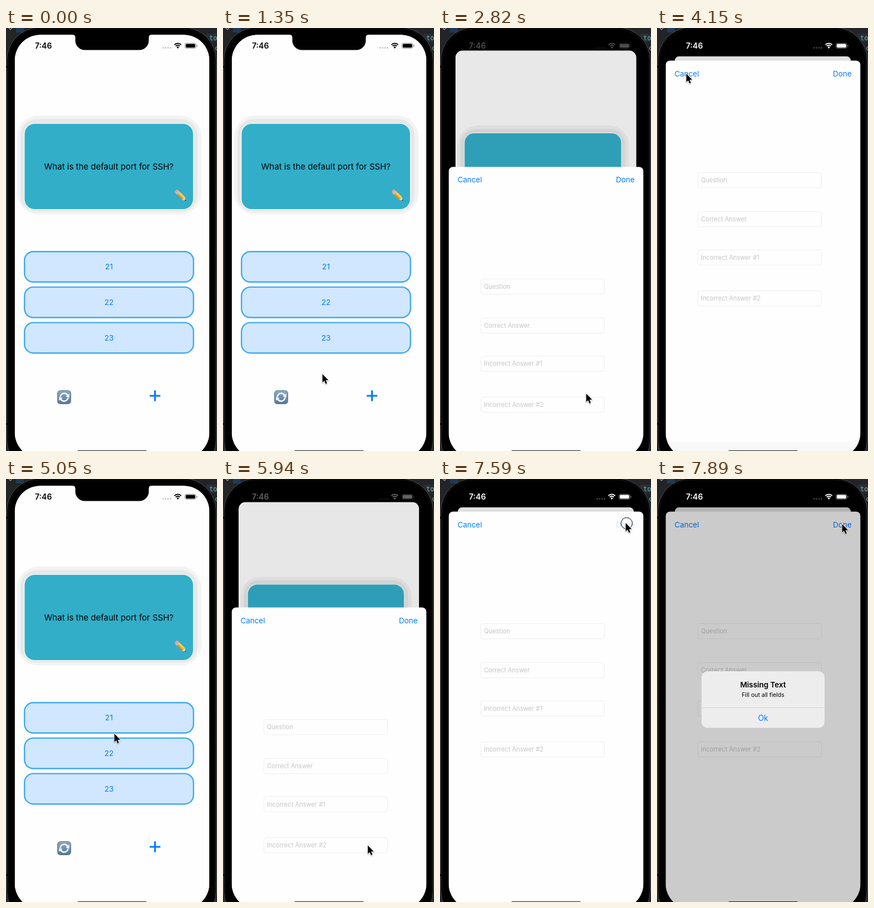
An HTML page with a canvas for the animation above (8000 ms loop, 379 by 759 pixels).

```html
<!DOCTYPE html>
<html lang="en">
<head>
<meta charset="utf-8">
<title>Quiz cards</title>
<style>
html, body { margin: 0; width: 100%; height: 100%; overflow: hidden; background: #1f2023; }
canvas { display: block; width: 379px; height: 759px; }
</style>
</head>
<body>
<canvas id="stage"></canvas>
<script>
const W = 379, H = 759, LOOP = 8000;
const BLUE = '#007aff';
const SCREEN = { x: 15.5, y: 12, w: 350, h: 760, r: 46 };
const SHEET_TOP = 58.5;
const canvas = document.getElementById('stage');
const ctx = canvas.getContext('2d');
const dpr = window.devicePixelRatio || 1;
canvas.width = W * dpr;
canvas.height = H * dpr;

const lerp = (a, b, k) => a + (b - a) * k;
const clamp = v => Math.max(0, Math.min(1, v));

const shortTicks = [3, 7, 12, 15, 20, 30];
const ticks = Array.from({ length: 47 }, (_, n) =>
  1050 + 150 * n - 10 * shortTicks.filter(s => s <= n).length);

// Pointer path: tick, x, y
const path = [
  [0, 305, 605], [1, 232, 608], [2, 178, 621], [3, 178, 621], [4, 192, 628],
  [6, 238, 648], [7, 255, 654], [8, 262, 656], [14, 262, 656], [15, 258, 640],
  [16, 238, 580], [17, 190, 430], [18, 130, 250], [19, 80, 130], [20, 56, 90],
  [21, 52, 82], [23, 52, 82], [24, 62, 115], [25, 95, 205], [26, 145, 330],
  [27, 194, 457], [28, 228, 560], [29, 250, 630], [30, 259, 655], [31, 259.5, 657.5],
  [38, 259.5, 657.5], [39, 267, 610], [40, 290, 420], [41, 315, 230], [42, 328, 120],
  [43, 333, 80], [44, 333, 79], [46, 332, 81]
];
const press = { 10: 'add', 22: 'cancel', 31: 'add', 44: 'done' };

function pointerAt(n) {
  const i = Math.max(1, path.findIndex(k => k[0] >= n));
  const [n0, x0, y0] = path[i - 1], [n1, x1, y1] = path[i];
  const k = (n - n0) / (n1 - n0);
  return [lerp(x0, x1, k), lerp(y0, y1, k)];
}

function spring(ms) {
  if (ms <= 0) return 0;
  const a = ms * 0.013;
  return 1 - (1 + a) * Math.exp(-a);
}

function sheetAt(t) {
  const p = t < 4390 ? spring(t - 2620) : t < 5729 ? 1 - spring(t - 4390) : spring(t - 5729);
  return p < 0.004 ? 0 : p > 0.997 ? 1 : p;
}

function rounded(x, y, w, h, r) {
  ctx.beginPath();
  ctx.roundRect(x, y, w, h, r);
}

function box(x, y, w, h, r, fill, stroke, line = 1) {
  rounded(x, y, w, h, r);
  if (fill) { ctx.fillStyle = fill; ctx.fill(); }
  if (stroke) { ctx.strokeStyle = stroke; ctx.lineWidth = line; ctx.stroke(); }
}

function circle(x, y, r) {
  ctx.beginPath();
  ctx.arc(x, y, r, 0, 7);
}

function poly(...pts) {
  ctx.beginPath();
  pts.forEach(([x, y]) => ctx.lineTo(x, y));
  ctx.closePath();
}

// y is the middle of the capitals
function label(str, x, y, size, color, align = 'left', weight = 400) {
  ctx.font = `${weight} ${size}px Inter, sans-serif`;
  ctx.textAlign = align;
  ctx.fillStyle = color;
  ctx.fillText(str, x, y + size * 0.364);
}

function faded(alpha, draw) {
  ctx.save();
  ctx.globalAlpha *= alpha;
  draw();
  ctx.restore();
}

function device() {
  ctx.fillStyle = '#232427';
  ctx.fillRect(0, 0, W, H);
  ctx.fillStyle = '#2a2d33';
  ctx.fillRect(360, 10, 19, 15);
  ctx.fillStyle = '#1f3a56';
  ctx.fillRect(18, 0, 14, 8);
  ctx.strokeStyle = '#a0a0a0';
  ctx.lineWidth = 1.2;
  ctx.beginPath();
  ctx.moveTo(5, 0); ctx.lineTo(8, 3); ctx.lineTo(11, 0);
  ctx.stroke();
  ctx.font = '12px "DejaVu Sans Mono", monospace';
  ctx.textAlign = 'left';
  ctx.fillStyle = '#66b5b8';
  ctx.fillText('to', 365, 22);
  ctx.fillText('c', 375, 40);
  box(1.5, -1, 376, 800, 59, '#000', '#4c4d50', 1);
  box(4, 1.5, 371, 800, 57, '#000', '#19191a', 1);
  ctx.fillStyle = '#09090a';
  ctx.fillRect(0, 68, 2, 3);
  ctx.fillRect(0, 709, 2, 3);
}

function pencil() {
  ctx.save();
  ctx.translate(304.5, 291.5);
  ctx.rotate(Math.PI / 4);
  box(0, -3.6, 5, 7.2, 2, '#ef9a9b');
  ctx.fillStyle = '#b9c0c5';
  ctx.fillRect(3.6, -3.6, 3.6, 7.2);
  ['#ffd85a', '#f9b92c', '#df8c1c'].forEach((c, i) => {
    ctx.fillStyle = c;
    ctx.fillRect(7.2, -3.6 + i * 2.4, 12.8, 2.5);
  });
  poly([20, -3.6], [26.5, 0], [20, 3.6]);
  ctx.fillStyle = '#f1d0a0';
  ctx.fill();
  poly([24, -1.5], [27, 0], [24, 1.5]);
  ctx.fillStyle = '#3a3a3a';
  ctx.fill();
  ctx.restore();
}

function refreshIcon() {
  const g = ctx.createLinearGradient(0, 650, 0, 675);
  g.addColorStop(0, '#8fabc4');
  g.addColorStop(1, '#527596');
  box(92.5, 650.5, 24, 24, 5, g, '#5c7c98', 1);
  for (const turn of [0, Math.PI]) {
    ctx.save();
    ctx.translate(104.5, 662.5);
    ctx.rotate(turn);
    ctx.strokeStyle = ctx.fillStyle = '#fff';
    ctx.lineWidth = 2.5;
    ctx.beginPath();
    ctx.arc(0, 0, 7, Math.PI * 1.03, Math.PI * 1.82);
    ctx.stroke();
    poly([9.3, -6.2], [9, 0.6], [2.8, -1.6]);
    ctx.fill();
    ctx.restore();
  }
}

function quiz(pressed) {
  ctx.fillStyle = '#fefefe';
  ctx.fillRect(SCREEN.x, SCREEN.y, SCREEN.w, SCREEN.h);
  box(20, 157, 331, 177.5, 38, '#f3f3f4');
  box(26, 163.5, 318, 166, 29, '#e6e8e8');
  box(32.2, 171.2, 304.8, 155, 19, '#f6fbfb');
  box(33.5, 172, 302.5, 153, 18, '#32aec8');
  label('What is the default port for SSH?', 184.8, 248.8, 15, '#000', 'center');
  pencil();
  ['21', '22', '23'].forEach((answer, i) => {
    const y = 401.2 + i * 63.7;
    box(33.2, y, 303.6, 54.6, 16, '#d0e7ff', '#3fa9f5', 2.4);
    label(answer, 185, y + 27.2, 13.6, BLUE, 'center');
  });
  refreshIcon();
  faded(pressed ? 0.7 : 1, () => {
    box(258, 658.4, 19.4, 3.1, 1, BLUE);
    box(266.1, 650, 3.1, 19.8, 1, BLUE);
  });
}

function quizBehind(p, pressed) {
  const scale = lerp(1, 317 / 351, p);
  ctx.save();
  ctx.translate(lerp(SCREEN.x, 32, p), lerp(SCREEN.y, 50.7, p));
  ctx.scale(scale, scale);
  ctx.translate(-SCREEN.x, -SCREEN.y);
  rounded(SCREEN.x, SCREEN.y, SCREEN.w, SCREEN.h, lerp(SCREEN.r, 9, Math.sqrt(p)));
  ctx.clip();
  quiz(pressed);
  ctx.fillStyle = `rgba(0,0,0,${0.12 * p})`;
  ctx.fillRect(SCREEN.x, SCREEN.y, SCREEN.w, SCREEN.h);
  ctx.restore();
}

function sheet(p, pressed, footer) {
  ctx.save();
  ctx.translate(0, lerp(772, SHEET_TOP, p));
  box(SCREEN.x, 0, SCREEN.w, 780, [8, 8, 0, 0], '#fefefe');
  if (footer) {
    ctx.fillStyle = '#f8f8f8';
    ctx.fillRect(SCREEN.x, 684.5, SCREEN.w, 40);
  }
  faded(pressed === 'cancel' ? 0.2 : 1, () => label('Cancel', 31.5, 23.3, 13.4, BLUE));
  faded(pressed === 'done' ? 0.2 : 1, () => label('Done', 349.5, 23.3, 13.4, BLUE, 'right'));
  const fields = [['Question', 201], ['Correct Answer', 271],
    ['Incorrect Answer #1', 339.5], ['Incorrect Answer #2', 413]];
  for (const [hint, y] of fields) {
    box(73.5, y, 222, 27.3, 4, '#fefefe', '#eeeeee', 1);
    label(hint, 79, y + 13.6, 11.1, '#c6c6c8');
  }
  ctx.restore();
}

function alertBox(k) {
  ctx.save();
  ctx.globalAlpha = k;
  const scale = lerp(1.35, 1, k);
  ctx.translate(190.5, 395.8);
  ctx.scale(scale, scale);
  ctx.translate(-190.5, -395.8);
  box(80, 345, 221, 101.5, 11, '#ededed');
  label('Missing Text', 190.5, 369.5, 13.4, '#000', 'center', 600);
  label('Fill out all fields', 190.5, 387, 10.5, '#000', 'center');
  ctx.fillStyle = '#d3d3d3';
  ctx.fillRect(80, 410, 221, 1);
  label('Ok', 190.5, 429, 13.8, BLUE, 'center');
  ctx.restore();
}

function notch() {
  ctx.fillStyle = '#000';
  ctx.beginPath();
  ctx.moveTo(119, 11);
  ctx.lineTo(119, 12);
  ctx.quadraticCurveTo(124.5, 12, 124.5, 17);
  ctx.lineTo(124.5, 22);
  ctx.arcTo(124.5, 39.5, 142, 39.5, 17);
  ctx.arcTo(256.5, 39.5, 256.5, 22, 17);
  ctx.lineTo(256.5, 17);
  ctx.quadraticCurveTo(256.5, 12, 262, 12);
  ctx.lineTo(262, 11);
  ctx.fill();
}

function statusBar(p) {
  const s = clamp((p - 0.65) / 0.28), v = Math.round(255 * s);
  const color = `rgb(${v},${v},${v})`;
  label('7:46', 52, 32, 14, color, 'left', 600);
  ctx.fillStyle = p > 0.5 ? `rgba(255,255,255,${0.28 * s})` : '#bdbdc0';
  for (let i = 0; i < 4; i++) {
    circle(282.3 + i * 4.4, 35.6, 1.4);
    ctx.fill();
  }
  ctx.strokeStyle = ctx.fillStyle = color;
  ctx.lineWidth = 2;
  for (const r of [5.3, 8.6]) {
    ctx.beginPath();
    ctx.arc(308.6, 36.2, r, -Math.PI * 0.75, -Math.PI * 0.25);
    ctx.stroke();
  }
  ctx.beginPath();
  ctx.moveTo(308.6, 37);
  ctx.arc(308.6, 36.2, 2.7, -Math.PI * 0.78, -Math.PI * 0.22);
  ctx.fill();
  faded(0.45, () => {
    box(321.3, 27.2, 20, 9.4, 3, null, color, 0.9);
    box(342.3, 30.2, 1.4, 3.6, 0.7, color);
  });
  box(322.8, 28.6, 17, 6.6, 1.6, color);
}

function pointer(x, y, clicked) {
  if (clicked) {
    circle(x + 2.3, y + 0.5, 10.2);
    ctx.strokeStyle = '#000';
    ctx.lineWidth = 1;
    ctx.stroke();
  }
  ctx.save();
  ctx.translate(x + 0.6, y);
  ctx.lineJoin = 'round';
  poly([0, 0], [0, 15], [3.4, 11.9], [5.8, 17.4], [8.3, 16.3], [5.9, 10.9], [10.6, 10.7]);
  ctx.shadowColor = 'rgba(0,0,0,.35)';
  ctx.shadowBlur = 2 * dpr;
  ctx.shadowOffsetY = dpr;
  ctx.strokeStyle = '#fff';
  ctx.lineWidth = 1.7;
  ctx.stroke();
  ctx.shadowColor = 'transparent';
  ctx.fillStyle = '#000';
  ctx.fill();
  ctx.restore();
}

function draw(time) {
  const n = ticks.filter(start => start <= time).length - 1;
  const t = n < 0 ? 0 : ticks[n];
  const p = sheetAt(t), pressed = press[n];
  const alertK = n === 45 ? 0.8 : n > 45 ? 1 : 0;

  ctx.setTransform(dpr, 0, 0, dpr, 0, 0);
  device();
  ctx.save();
  rounded(SCREEN.x, SCREEN.y, SCREEN.w, SCREEN.h, SCREEN.r);
  ctx.clip();
  quizBehind(p, pressed === 'add');
  if (p > 0) sheet(p, pressed, t < 5000);
  if (alertK) {
    ctx.fillStyle = `rgba(0,0,0,${lerp(0.1, 0.2, alertK)})`;
    ctx.fillRect(0, 0, W, H);
    alertBox(alertK);
  }
  box(128, 758, 125, 4, 2, '#111');
  ctx.restore();
  notch();
  statusBar(p);
  if (n >= 0) pointer(...pointerAt(n), pressed);
}

function loop() {
  draw(performance.now() % LOOP);
  requestAnimationFrame(loop);
}
loop();
</script>
</body>
</html>
```
